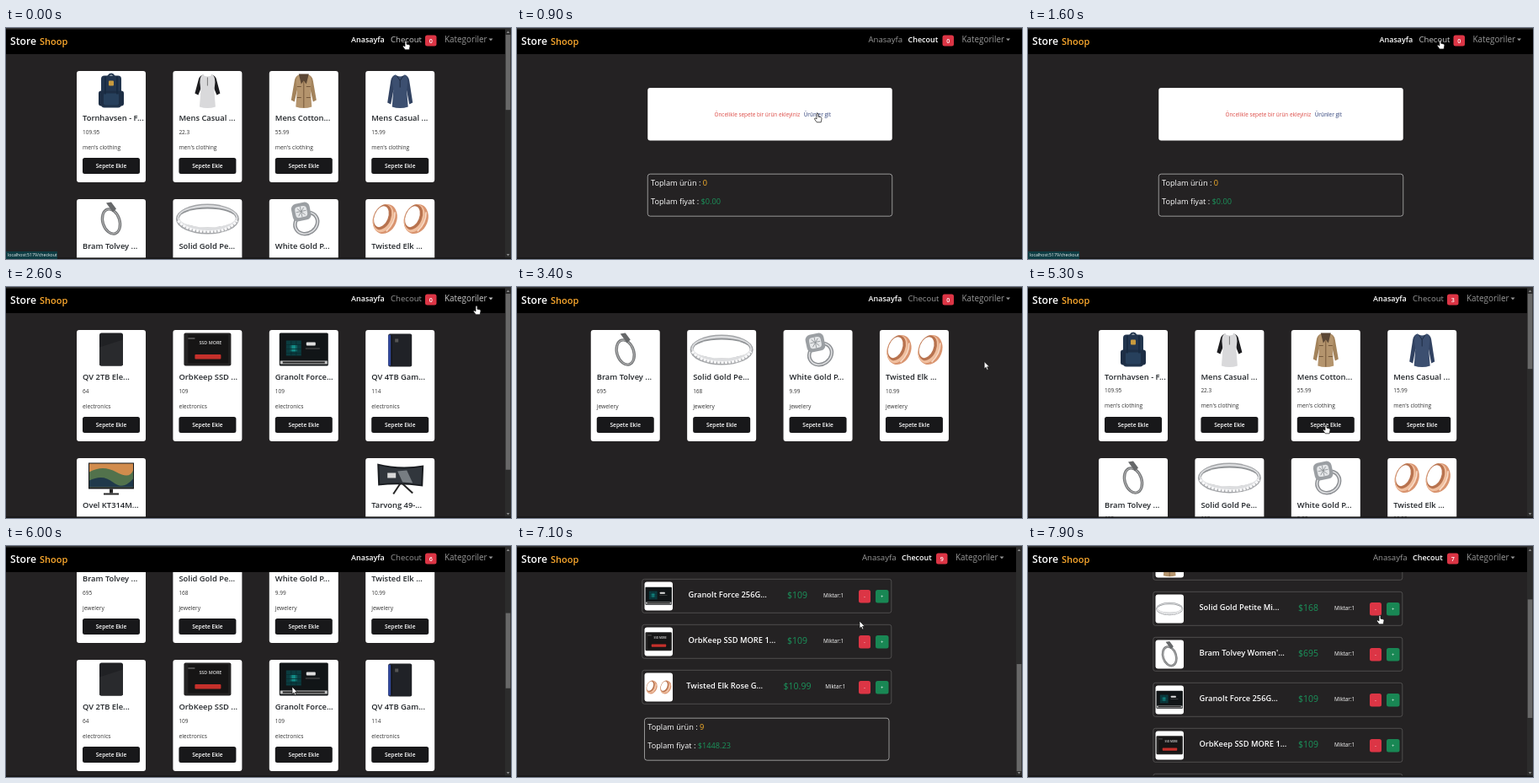
Animation of 600x274 px, one loop 8 s. Source, as an HTML page:

```html
<!DOCTYPE html>
<html lang="tr">
<head>
<meta charset="utf-8">
<style>
html, body { margin: 0; width: 100%; height: 100%; overflow: hidden; background: #242223; }
svg { display: block; width: 100vw; height: 100vh; font-family: "Open Sans", "Noto Sans", sans-serif; }
.b { font-weight: 600; }
.m { text-anchor: middle; }
</style>
</head>
<body>
<svg viewBox="0 0 600 274">
  <rect width="600" height="274" fill="#242223"/>
  <g id="content"></g>
  <rect width="600" height="31" fill="#000"/>
  <text class="b" x="5" y="19.8" font-size="12.2" fill="#fff">Store</text>
  <text class="b" x="40" y="19.8" font-size="11" fill="#ffab2e">Shoop</text>
  <g id="nav">
    <text id="home" x="410" y="17.4">Anasayfa</text>
    <text id="checkout" x="457" y="17.4">Checout</text>
    <rect x="498" y="8.5" width="13.5" height="13" rx="2.5" fill="#dc3545"/>
    <text id="badge" class="b m" x="504.7" y="17.6" font-size="7.2" fill="#fff"></text>
    <g id="menu"><text x="521" y="17.4" font-size="9.9">Kategoriler</text><path d="M573.5 12.6h5l-2.5 2.6z"/></g>
  </g>
  <g id="bar">
    <rect x="593" width="7" height="274" fill="#2c2c2c"/>
    <path d="M594.7 6l1.8-2.5 1.8 2.5zM594.7 268l1.8 2.5 1.8-2.5z" fill="#8a8a8a"/>
    <rect id="thumb" x="593.7" width="5.6" fill="#686868"/>
  </g>
  <rect width="600" height="1.6" fill="#333"/>
  <rect y="272.4" width="600" height="1.6" fill="#171717"/>
  <g id="status">
    <rect id="statusBox" y="265" height="9" fill="#0d3b42"/>
    <text id="statusText" x="2" y="271.2" font-size="5.2" fill="#f2f6f6"></text>
  </g>
  <g id="cursor" stroke="#111" stroke-width=".7" stroke-linejoin="round" fill="#fff">
    <path id="arrow" d="M0 0V8.6L2 6.9 3.4 10 4.9 9.4 3.5 6.3H6.2Z"/>
    <path id="hand" d="M-1 .8Q0-.7 1 .8V4.2L4 4.8Q5.2 5.2 5 6.6L4.2 10.8H-.8L-3.4 7.2Q-3.8 5.7-2.3 6L-1 7Z"/>
  </g>
</svg>
<script>
const $ = id => document.getElementById(id);
const LOOP = 8000;

// Artwork helpers, drawn around the middle of the picture area
const rect = (x, y, w, h, fill, rx = 0) =>
  `<rect x="${x}" y="${y}" width="${w}" height="${h}" rx="${rx}" fill="${fill}"/>`;
const path = (d, fill) => `<path d="${d}" fill="${fill}"/>`;
const line = (d, color, width = 1) =>
  `<path d="${d}" fill="none" stroke="${color}" stroke-width="${width}"/>`;
const oval = (x, y, rx, ry, fill, tilt = 0) =>
  `<ellipse rx="${rx}" ry="${ry}" fill="${fill}" transform="translate(${x} ${y}) rotate(${tilt})"/>`;
const ring = (x, y, rx, ry, color, width, tilt = 0) =>
  `<ellipse rx="${rx}" ry="${ry}" fill="none" stroke="${color}" stroke-width="${width}" transform="translate(${x} ${y}) rotate(${tilt})"/>`;
const garment = (body, sleeve, cuff) => {
  const arm = s => path(`M${s * 5}-19Q${s * 10}-18 ${s * 11}-12L${s * 15} ${cuff}L${s * 11} ${cuff + 2}L${s * 7}-5Z`, sleeve);
  return arm(-1) + arm(1) + path("M-6-19Q0-15 6-19Q9-17 9-10L8 0 9.5 19Q0 22-9.5 19L-8 0-9-10Q-9-17-6-19Z", body);
};
const cuff = (x, tilt) => `<g transform="translate(${x} 0) rotate(${tilt})">` +
  oval(0, 0, 14, 18, "#d9946f") + oval(-2, 0, 11.5, 17, "#f0bf9f") + oval(-3.5, -1, 10, 15.5, "#b8734f") +
  oval(-5, -1, 8, 13, "#fff") + line("M8-12Q13 0 7 13", "#f9dcc8", 1.6) + "</g>";
const dots = (n, color) => Array.from({ length: n }, (_, i) =>
  `<circle cx="${i * 7 % 17 - 8}" cy="${i * 11 % 33 - 12}" r=".8" fill="${color}"/>`).join("");

const art = {
  backpack: line("M-4-17Q0-23 4-17", "#263a52", 2) + rect(-12, -18, 24, 38, "#23364f", 4) +
    rect(-15, 0, 30, 18, "#1d2e45", 3) + rect(-9, 3, 18, 14, "#27405c", 2) +
    line("M-7-17V4M7-17V4", "#172a40", 1.6) + rect(-3, -12, 6, 6, "#c89a3e", 1),
  raglan: garment("#d9d9db", "#1c1c1f", 3) + line("M0-16V-6", "#777"),
  jacket: garment("#b4946d", "#a3835c", 11) + path("M-6-20H6L3-8 0-12-3-8Z", "#5b4634") +
    line("M0-11V20M-8 8H-3M3 8H8M-8-5H-3M3-5H8", "#75583b", 1),
  sweater: garment("#3c4f70", "#314261", 14) + line("M-4-18L0-12 4-18M0-12V-4", "#1f2c42"),
  bracelet: ring(0, 3, 10, 15, "#77797b", 3.4, -18) + ring(0, 3, 10, 15, "#bbb", .9, -18) +
    path("M-6-19L0-20 6-12 2-8Z", "#66686a"),
  band: oval(0, 0, 37.5, 18, "#a3a5a8") + oval(0, -1, 36, 15.5, "#dcdddf") + oval(0, -2, 34, 12, "#8f9295") +
    oval(0, -1, 33.5, 11, "#fff") +
    `<path d="M-35 2Q-25 14.5 0 15T35 2" fill="none" stroke="#f7f7f8" stroke-width="3.2" stroke-dasharray="3 1.2"/>`,
  solitaire: ring(3, 5, 14, 12, "#8d9094", 4.5, -35) + ring(3, 5, 14, 12, "#e0e1e3", 1.5, -35) +
    `<g transform="translate(-3 -8) rotate(-12)">` + rect(-11, -11, 22, 21, "#9b9fa3", 6) + rect(-7, -7, 14, 13, "#e4e6e8", 4) +
    line("M-6-1H6M0-7V6M-4-5L4 4M4-5L-4 4", "#8d9195", .8) + "</g>",
  rings: cuff(-18, 22) + cuff(19, 22),
  drive: rect(-14, -20, 28, 39, "#202124", 2.5) + path("M-14-3L14-12V17Q14 19 11 19H-11Q-14 19-14 17Z", "#292a2d"),
  ssd: rect(-28, -20, 56, 39, "#242323", 2) + rect(-23, -18, 48, 34, "#161515") +
    `<text class="b" x="-10" y="-7" font-size="5.4" fill="#ddd">SSD MORE</text>` +
    rect(-15, 5.5, 31, 5.5, "#c5302b", 1) + rect(-23, -14, 8, 1, "#888"),
  chip: rect(-29, -20, 58, 39, "#111517", 1.5) + rect(-21, -11, 18, 18, "#0b3c40") + rect(-16, -6, 8, 8, "#128a85") +
    line("M-21-6H-3M-21-1H-3M-21 4H-3M-15-11V7M-9-11V7", "#0a2c2f", .8) + rect(3, -9, 11, 4, "#ddd", 1) +
    rect(2, -2, 17, 1, "#555") + rect(-28, 13, 56, 4, "#c4c4c4") + line("M-25 15H25", "#222", 2.2),
  gamer: rect(-14, -19, 28, 39, "#202227", 2) + rect(-14, -18, 3, 37, "#30479b", 1.5) + line("M-10-17V18", "#101115") +
    rect(-6, -13, 4, 4, "#555"),
  monitor: rect(-27, -18, 54, 31, "#16181b") + rect(-26, -17, 52, 28, "#d18c4d") + path("M-26-7Q-10-16 6-7T26-9V11H-26Z", "#52724c") +
    path("M-26 3Q-10-5 2 5T26 1V11H-26Z", "#20394b") + rect(-2, 13, 4, 5, "#222") + rect(-9, 18, 18, 2, "#292929"),
  wide: path("M-27-17Q0-10 28-15L27 10Q0 6-26 9Z", "#191c20") + path("M-25-15Q0-8 26-13L25 8Q0 4-24 7Z", "#31363c") +
    path("M-3-8L8-9 15 6 3 5Z", "#777d82") + rect(-15, -6, 10, 6, "#d8d8d8") + line("M0 7L-8 19M3 7L15 18", "#252525", 2),
  purple: garment("#3b244f", "#33203f", 12) + path("M-6-13Q-7-22 0-22T6-13L0-9Z", "#4c3262") + line("M0-10V20", "#76568a", .7) + dots(10, "#6f4878"),
  leather: garment("#282729", "#1e1d1f", 13) + path("M-5-20H5L4-10 0-5-4-10Z", "#3d3c3e") + line("M1-5V20M-6 7H-2M4 7H7", "#666", .8),
  rain: garment("#27364f", "#213047", 11) + path("M-2-17H4L5 19H1Z", "#c9d0dc") +
    line("M1-14L3 19M-4-14V19", "#6c80a2", .8) + path("M-7-15Q-7-24 0-22T7-15L4-10H-3Z", "#253750"),
  white: garment("#ececee", "#e0e0e3", -5) + line("M-5-18Q0-12 5-18M-4 0L-6 18M5 1L3 19", "#cfcfd3", .8),
  red: garment("#cf2b39", "#bd2431", -5) + path("M-4-19H4L0-10Z", "#f6e9e8") + line("M-5-6V18M0-7V19M5-6V18", "#ad1d2b", .6),
  violet: garment("#4a304e", "#40283f", -5) + `<g transform="translate(0 -3) scale(.7)">${dots(10, "#c47086")}</g>` +
    path("M6 8L17 5 20 17 10 20Z", "#798aa4") + path("M-20 12L-11 9-7 18-16 20Z", "#dedddd")
};

const product = (title, price, kind, image, width = 42, full = title) => ({ title, price, kind, image, width, full });
const MEN = "men's clothing", JEWEL = "jewelery", ELEC = "electronics", WOMEN = "women's clothing";
const products = [
  product("Tornhavsen - F", 109.95, MEN, "backpack", 42, "Tornhavsen - Foldsac"),
  product("Mens Casual ", 22.3, MEN, "raglan", 42, "Mens Casual Premi"),
  product("Mens Cotton", 55.99, MEN, "jacket", 42, "Mens Cotton Jack"),
  product("Mens Casual ", 15.99, MEN, "sweater"),
  product("Bram Tolvey ", 695, JEWEL, "bracelet", 42, "Bram Tolvey Women'"),
  product("Solid Gold Pe", 168, JEWEL, "band", 76, "Solid Gold Petite Mi"),
  product("White Gold P", 9.99, JEWEL, "solitaire"),
  product("Twisted Elk ", 10.99, JEWEL, "rings", 72, "Twisted Elk Rose G"),
  product("QV 2TB Ele", 64, ELEC, "drive"),
  product("OrbKeep SSD ", 109, ELEC, "ssd", 58, "OrbKeep SSD MORE 1"),
  product("Granolt Force", 109, ELEC, "chip", 60, "Granolt Force 256G"),
  product("QV 4TB Gam", 114, ELEC, "gamer"),
  product("Ovel KT314M", 599, ELEC, "monitor"),
  product("Tarvong 49-", 999.99, ELEC, "wide"),
  product("QORVEMINT", 56.99, WOMEN, "purple"),
  product("Dusk and Faw", 29.95, WOMEN, "leather"),
  product("Rain Jacket ", 39.99, WOMEN, "rain"),
  product("KVZ Women'", 9.85, WOMEN, "white"),
  product("Ulmi Wome", 7.95, WOMEN, "red"),
  product("FELTROU W", 12.99, WOMEN, "violet")
];

// Timelines: [time, value...]
const pages = [[0, "home"], [400, "checkout"], [1000, "home"], [1500, "checkout"], [2150, ELEC], [2950, JEWEL],
  [3450, MEN], [3950, WOMEN], [4550, "home"], [6750, "checkout"]];
const activeLinks = [[0, "home"], [400, "checkout"], [1000, "home"], [1650, "checkout"], [2150, "home"], [6750, "checkout"]];
// Cart events: time, product index and change in quantity
const cartEvents = [[4900, 0, 1], [5100, 1, 1], [5280, 2, 1], [5600, 5, 1], [5720, 5, 1], [5850, 4, 1],
  [6150, 10, 1], [6330, 9, 1], [6520, 7, 1], [7500, 0, -1], [7850, 5, -1]];
const scrollKeys = [[0, 0], [5300, 0], [5520, 220], [6749, 220], [6750, 0], [6850, 0], [7050, 285], [7150, 285],
  [7400, 0], [7520, 0], [7750, 108]];
const cursorKeys = [[0, 475, 15], [450, 477, 15], [850, 357, 101], [1050, 357, 101], [1450, 489, 15], [1650, 490, 14],
  [1850, 567, 15], [2050, 560, 60], [2200, 560, 60], [2600, 559, 22], [2700, 560, 18], [2900, 555, 75], [3150, 562, 18],
  [3380, 555, 90], [3620, 562, 18], [3880, 555, 105], [4000, 555, 105], [4400, 430, 13], [4570, 430, 14],
  [4860, 125, 163], [4920, 125, 163], [5080, 239, 163], [5130, 239, 163], [5260, 354, 163], [5320, 354, 163],
  [5560, 239, 95], [5740, 239, 95], [5840, 125, 95], [5870, 125, 95], [6000, 340, 167], [6130, 354, 247],
  [6180, 354, 247], [6310, 239, 247], [6350, 239, 247], [6500, 468, 95], [6540, 468, 95], [6700, 476, 15],
  [6800, 476, 15], [7100, 407, 89], [7400, 413, 76], [7520, 413, 76], [7900, 418, 82]];

const last = (list, t) => list.findLast(k => k[0] <= t)[1];
function tween(keys, t) {
  const i = keys.findLastIndex(k => k[0] <= t);
  const from = keys[i], to = keys[i + 1] || from;
  const p = to === from ? 0 : (t - from[0]) / (to[0] - from[0]);
  return from.slice(1).map((v, j) => v + (to[j + 1] - v) * p * p * (3 - 2 * p));
}

const text = (x, y, size, fill, value, cls = "") =>
  `<text x="${x}" y="${y}" font-size="${size}" fill="${fill}" class="${cls}">${value}</text>`;

function cardView(p, x, y) {
  return `<g transform="translate(${x} ${y})">` + rect(0, 0, 82, 132, "#fff", 3) +
    `<g transform="translate(41 23.5)">${art[p.image]}</g>` +
    text(7, 59.3, 9.4, "#212529", p.title + "...", "b") + text(7, 74.5, 6.5, "#333", p.price) +
    text(7, 92.5, 6.7, "#333", p.kind) + rect(7, 103, 68, 19, "#18181a", 2.5) +
    text(41, 115, 6.6, "#fff", "Sepete Ekle", "b m") + "</g>";
}

function shopView(page) {
  const list = products.filter(p => page === "home" || p.kind === page);
  const rows = Math.ceil(list.length / 4);
  const html = list.map((p, i) => {
    const pair = list.length % 4 === 2 && i === list.length - 1;
    return cardView(p, 84 + 114.4 * (pair ? 3 : i % 4), 51 + 152 * Math.floor(i / 4));
  }).join("");
  return { html, height: 36 + 152 * rows };
}

function rowView({ p, qty }, y) {
  // A wider price pushes its neighbours apart
  const spread = (String(p.price).length - 3) * 1.1;
  return `<g transform="translate(148.5 ${y})">` +
    `<rect x=".3" y=".3" width="296" height="40" rx="2.5" fill="none" stroke="#626061" stroke-width=".7"/>` +
    rect(3, 3.5, 33.5, 34, "#fff", 3) +
    `<g transform="translate(19.7 20.5) scale(${32.5 / p.width})">${art[p.image]}</g>` +
    text(55 - spread, 22.3, 9.3, "#fff", p.full + "...", "b") + text(184.5, 23, 10.5, "#1b935b", "$" + p.price, "m") +
    text(215.5 + spread, 21.8, 6.3, "#fff", "Miktar:" + qty) +
    rect(257.5, 13, 14, 15.5, "#dc3545", 2.5) + rect(277.5, 13, 15.5, 15.5, "#198754", 2.5) +
    text(264.5, 22.8, 6, "#fff", "-", "m") + text(285.2, 22.8, 6, "#fff", "+", "m") + "</g>";
}

function checkoutView(cart, count) {
  const top = cart.length ? 57 + 54 * cart.length : 173;
  const sum = cart.reduce((s, c) => s + c.p.price * c.qty, 0).toFixed(2);
  const items = cart.length ? cart.map((c, i) => rowView(c, 54 + 54 * i)).join("")
    : rect(151.5, 71, 290.5, 62.5, "#fff", 3) +
      text(230.7, 104.7, 6.4, "#dc4a45", "Öncelikle sepete bir ürün ekleyiniz") +
      text(337, 104.7, 6.2, "#5c6a96", "Ürünler git", "b");
  const label = (name, y, color, value) =>
    text(155.2, y, 9.2, "#fff", `${name} : <tspan fill="${color}">${value}</tspan>`);
  const html = items +
    `<rect x="151.5" y="${top + .2}" width="290.5" height="50" rx="3" fill="none" stroke="#c9c9c9" stroke-width=".7"/>` +
    label("Toplam ürün", top + 14.2, "#ffb52b", count) + label("Toplam fiyat", top + 36, "#1b935b", "$" + sum);
  return { html, height: top + 70 };
}

let view, viewKey;
function render(t) {
  const page = last(pages, t), active = last(activeLinks, t);
  const cart = new Map();
  let count = 0;
  for (const [time, id, change] of cartEvents) {
    if (time > t) break;
    cart.set(id, (cart.get(id) || 0) + change);
    count += change;
  }
  const key = page + count;
  if (key !== viewKey) {
    const lines = [...cart].filter(c => c[1]).map(([id, qty]) => ({ p: products[id], qty }));
    view = page === "checkout" ? checkoutView(lines, count) : shopView(page);
    $("content").innerHTML = view.html;
    viewKey = key;
  }

  const [scroll] = tween(scrollKeys, t);
  const tall = view.height > 274, shift = tall ? 0 : 7.5;
  $("content").setAttribute("transform", `translate(${shift / 2} ${-scroll})`);
  $("nav").setAttribute("transform", `translate(${shift} 0)`);
  $("bar").style.display = tall ? "" : "none";
  $("thumb").setAttribute("y", 8 + 259 * scroll / view.height);
  $("thumb").setAttribute("height", Math.min(259, 259 * 274 / view.height));

  const [x, y] = tween(cursorKeys, t);
  const over = (x0, y0, x1, y1) => x >= x0 && x <= x1 && y >= y0 && y <= y1;
  const hover = {
    home: over(407 + shift, 6, 452 + shift, 25),
    checkout: over(454 + shift, 6, 513 + shift, 25),
    menu: over(518 + shift, 6, 581 + shift, 25)
  };
  for (const id of ["home", "checkout", "menu"]) {
    const on = id === active;
    $(id).setAttribute("fill", on ? "#fff" : hover[id] ? "#c8c8c8" : "#989898");
    if (id === "menu") continue;
    $(id).setAttribute("class", on ? "b" : "");
    $(id).setAttribute("font-size", on ? 9 : 9.6);
  }
  $("badge").textContent = count;

  const link = hover.home ? "localhost:5179" : hover.checkout ? "localhost:5179/checkout" : "";
  $("status").style.display = link ? "" : "none";
  $("statusText").textContent = link;
  $("statusBox").setAttribute("width", hover.home ? 38 : 61);

  const row = (y + scroll - 54) % 54, cell = (x - 84) % 114.4, cardY = (y + scroll - 51) % 152;
  const onButton = y > 31 && (page === "checkout"
    ? count ? over(406, 31, 442, 274) && row >= 13 && row <= 28.6 : over(340, 95, 378, 107)
    : cell >= 7 && cell <= 75 && cardY >= 103 && cardY <= 122);
  const hand = hover.home || hover.checkout || hover.menu || onButton;
  $("hand").style.display = hand ? "" : "none";
  $("arrow").style.display = hand ? "none" : "";
  $("cursor").setAttribute("transform", `translate(${x} ${y})`);
}

const start = performance.now();
function tick() {
  render((performance.now() - start) % LOOP);
  requestAnimationFrame(tick);
}
tick();
</script>
</body>
</html>
```
